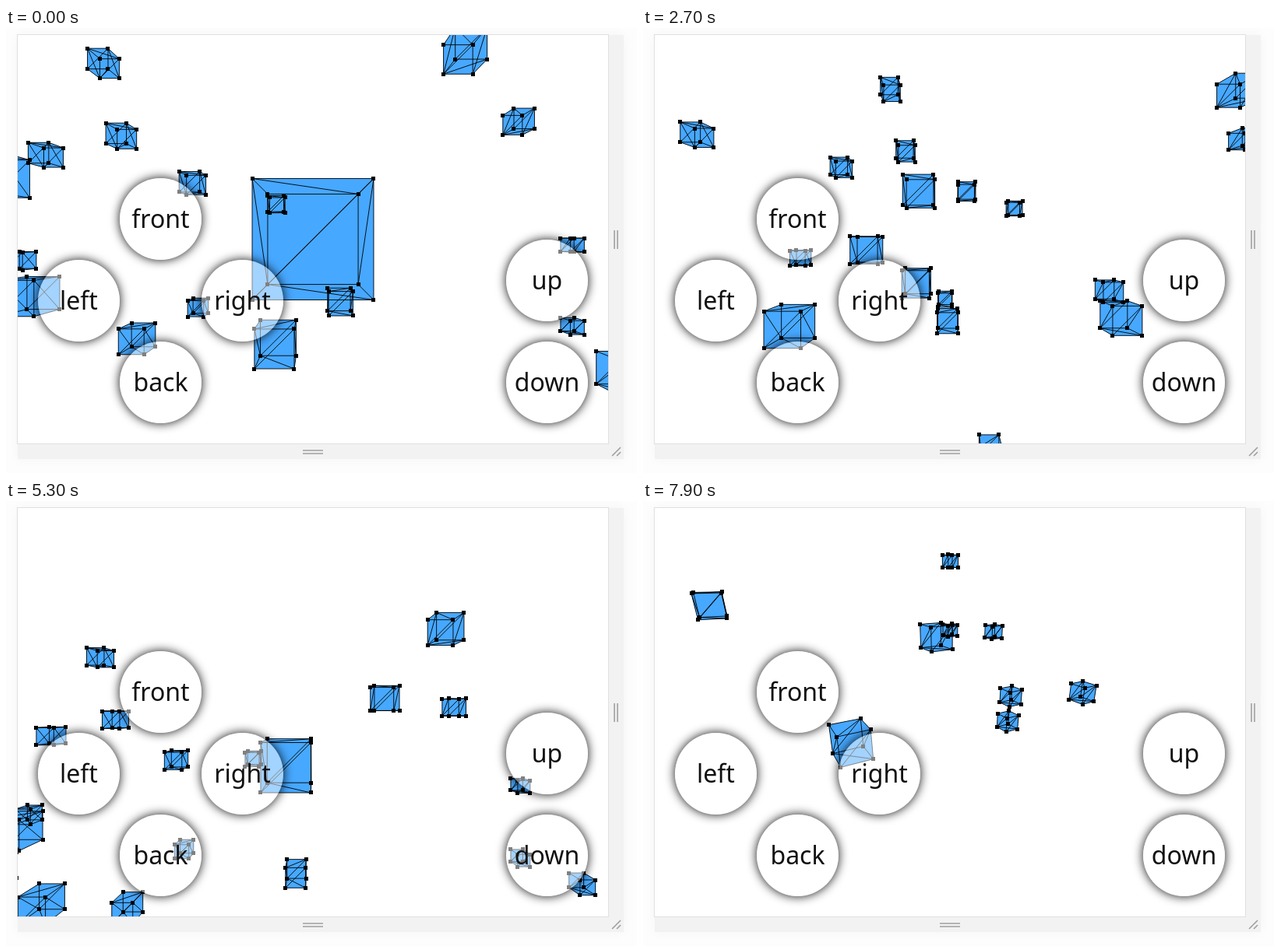
Write an HTML page with a canvas that moves like this. It is 810x572 px and loops after 8 s.

```html
<!DOCTYPE html>
<html lang="en">
<head>
<meta charset="utf-8">
<style>
html, body { margin: 0; width: 100%; height: 100%; overflow: hidden; background: #fdfdfd; }
.tray { position: absolute; left: 15px; top: 9px; width: 778px; height: 545px; background: #f2f2f2; box-shadow: 0 0 14px rgba(0,0,0,.04); }
canvas { position: absolute; left: 15px; top: 9px; background: #fff; outline: 1px solid #e0e0e0; }
.btn {
  position: absolute; width: 105px; height: 105px; margin: -52.5px 0 0 -52.5px; border-radius: 50%;
  background: rgba(255,255,255,.5); box-shadow: 0 0 13px rgba(0,0,0,.95);
  font: 32px/103px "Noto Sans", "Open Sans", sans-serif; color: #111; text-align: center;
}
svg { position: absolute; left: 0; top: 0; }
</style>
</head>
<body>
<div class="tray"></div>
<canvas id="view" width="758" height="525"></canvas>
<div class="btn" style="left:198.5px;top:245px">front</div>
<div class="btn" style="left:93.5px;top:350.5px">left</div>
<div class="btn" style="left:303.5px;top:350.5px">right</div>
<div class="btn" style="left:198.5px;top:455px">back</div>
<div class="btn" style="left:694.5px;top:324px">up</div>
<div class="btn" style="left:694.5px;top:455px">down</div>
<svg width="810" height="572" fill="none" stroke="#a0a0a0" stroke-width="1.6">
  <path d="M781 260V284M785 260V284M381 543H407M381 547H407M778 550L789 539M784 550L789 545"/>
</svg>
<script>
const view = document.getElementById('view'), ctx = view.getContext('2d');
const FOCAL = view.height / 2 / Math.tan(Math.PI / 6); // 60 degree field of view
const LOOP = 8000, STEP = 100, NEAR = .2;

// Unit cubes stand in layers: the depth, then the left and top of each cube.
const layer = (z, ...spots) => spots.map(([x, y]) => [x, y, z]);
const cubes = [
  layer(2.915, [-.5, -.5]),
  layer(3.98, [.96, -4.98]),
  layer(6.5, [-12, 1.95], [-14.44, 7.25], [3.84, 5.78]),
  layer(8.38, [-8.5, -2.1]),
  layer(8.9, [-1.47, 2.26]),
  layer(9.8, [-10.6, -.1], [6.49, -9.21], [8.64, 3.42], [-8.72, 1.14], [18.48, 7.54]),
  layer(11.1, [4.46, -6.65]),
  layer(13.8, [-7.58, 3.5], [-5.5, 9.88], [16.37, 8.59], [16.24, 10.38]),
  layer(14.5, [.64, 2.14], [-20.35, -5.82]),
  layer(17.2, [-10.95, -9.28], [-10.06, -5.65], [-13.83, -4.7], [9.76, -6.37], [-6.5, -3.29]),
  layer(20, [-17.4, .74], [19.4, 5.35]),
  layer(22.1, [-7.82, 3.84], [-2.82, -2.72]),
  layer(25.4, [18.46, -.08], [18.46, 5.85])
].flat();

// Each press or drag moves one camera value by an amount over a number of steps.
const move = (axis, start, steps, by) => ({ axis, start, steps, by });
const moves = [
  move('z', 400, 4, -5.74),    // front
  move('z', 1200, 6, 8.81),    // back
  move('x', 2100, 6, 6.97),    // left
  move('x', 3200, 6, -8.97),   // right
  move('y', 4300, 5, 7.17),    // up
  move('y', 5200, 5, -8.59),   // down
  move('yaw', 6100, 5, 25),
  move('yaw', 6600, 13, -55.3),
  move('pitch', 6350, 15.5, 21.4)
];

function cameraAt(t) {
  const cam = { x: 0, y: 0, z: 0, yaw: 0, pitch: 0 };
  for (const { axis, start, steps, by } of moves) {
    const done = Math.min(1, Math.max(0, (t - start) / (steps * STEP)));
    cam[axis] += by * done ** 1.05;
  }
  return cam;
}

const turn = (u, v, deg) => {
  const a = deg * Math.PI / 180, c = Math.cos(a), s = Math.sin(a);
  return [u * c + v * s, v * c - u * s];
};

function project(cam, px, py, pz) {
  const [x, z] = turn(px + cam.x, pz + cam.z, cam.yaw);
  const [depth, y] = turn(z, py + cam.y, cam.pitch);
  const k = FOCAL / depth;
  return { x: view.width / 2 + x * k, y: view.height / 2 + y * k, depth };
}

// Corner index bits: 1 = right, 2 = bottom, 4 = far.
const corners = [...Array(8).keys()];
const faces = [[1, 2], [1, 4], [2, 4]].flatMap(([p, q]) =>
  [0, 7 - p - q].map(side => [0, p, p + q, q].map(i => i + side)));
const diagonals = [[2, 1, 7], [3, 6, 0, 5, 6]];

function trace(points, ids) {
  ids.forEach((id, i) => ctx[i ? 'lineTo' : 'moveTo'](points[id].x, points[id].y));
}

function draw(t) {
  const cam = cameraAt(t);
  const shapes = cubes
    .map(([x, y, z]) => corners.map(i => project(cam, x + (i & 1), y + (i >> 1 & 1), z + (i >> 2))))
    .filter(points => points.every(p => p.depth > NEAR));

  ctx.clearRect(0, 0, view.width, view.height);
  ctx.fillStyle = '#47a8ff';
  for (const points of shapes) {
    for (const face of faces) {
      ctx.beginPath();
      trace(points, face);
      ctx.fill();
    }
  }

  ctx.strokeStyle = ctx.fillStyle = '#000';
  ctx.lineWidth = .9;
  for (const points of shapes) {
    ctx.beginPath();
    for (const i of corners) {
      for (const bit of [1, 2, 4]) if (!(i & bit)) trace(points, [i, i + bit]);
    }
    for (const line of diagonals) trace(points, line);
    ctx.stroke();
    for (const p of points) ctx.fillRect(Math.round(p.x - 2.5), Math.round(p.y - 2.5), 5, 5);
  }
}

const start = performance.now();
let shown = -1;
function tick() {
  const t = Math.floor((performance.now() - start) % LOOP / STEP) * STEP;
  if (t !== shown) draw(shown = t);
  requestAnimationFrame(tick);
}
tick();
</script>
</body>
</html>
```
